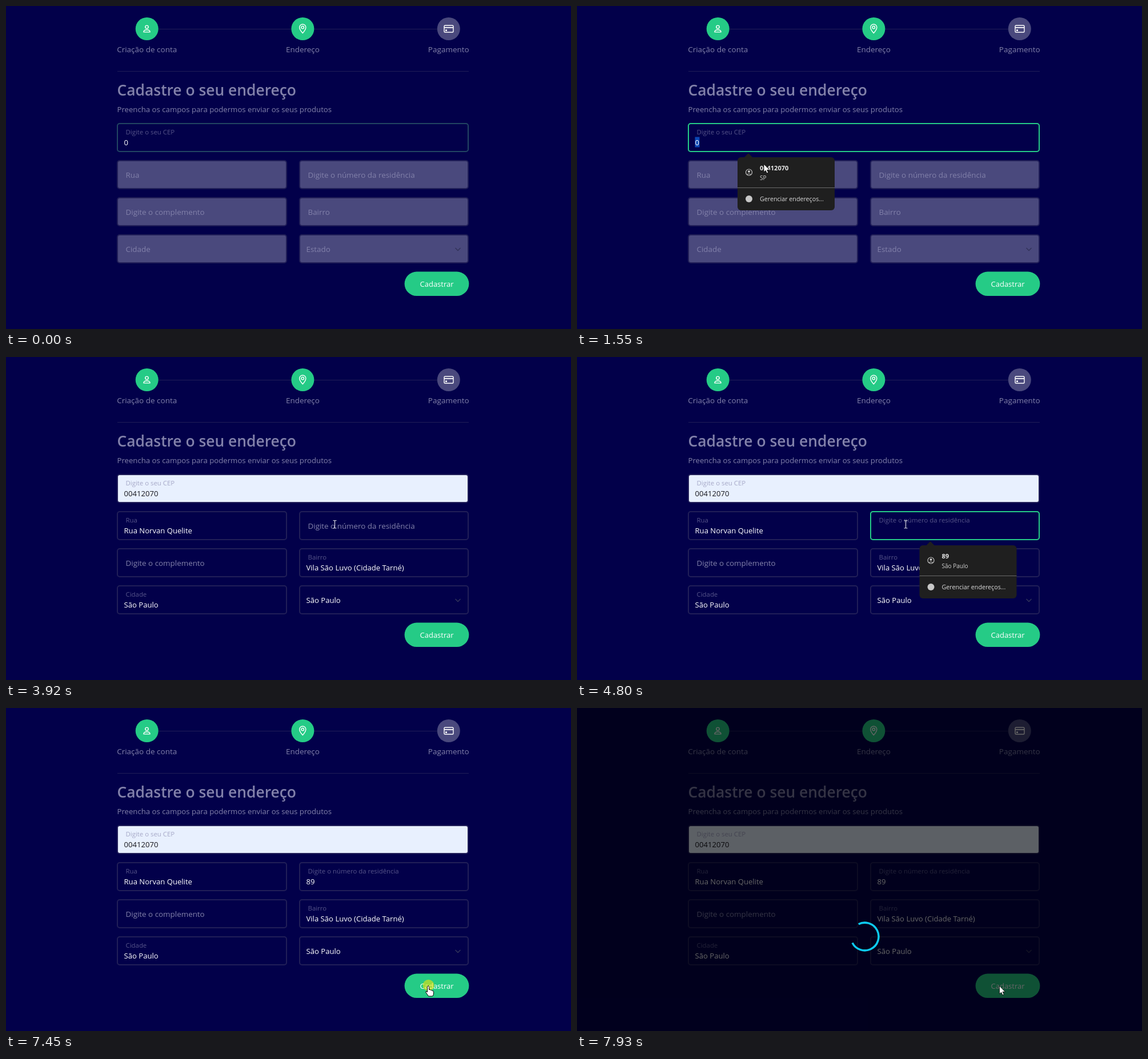
Animation of 989 by 566 pixels, one loop 8000 ms. Source, as an HTML page:

```html
<!DOCTYPE html>
<html lang="pt-BR">
<head>
<meta charset="utf-8">
<title>Cadastro de endereço</title>
<style>
html, body { margin: 0; width: 100%; height: 100%; overflow: hidden; background: #02004a; }
svg { display: block; font: 13.4px "Open Sans", "Noto Sans", sans-serif; white-space: pre; }
</style>
</head>
<body>
<svg id="stage" width="989" height="566" viewBox="0 0 989 566"></svg>
<script>
const LOOP = 8000;
const GREEN = '#25cb86', DIM = '#8281aa', LINE = '#211f58', GREY = '#4a497d';
const CEP = '00412070', STREET = 'Rua Norvan Quelite', DISTRICT = 'Vila São Luvo (Cidade Tarné)';
const FILLED = 2300, BLUR = 6800, LOADING = 7518;

const ramp = (t, a, b) => Math.min(1, Math.max(0, (t - a) / (b - a)));
const ease = p => p * p * (3 - 2 * p);
const within = (v, a, b) => v >= a && v < b;

const text = (x, y, s, fill = DIM, extra = '') => `<text x="${x}" y="${y}" fill="${fill}" ${extra}>${s}</text>`;
const middle = 'text-anchor="middle"';
const valueFont = 'font-size="13.1" font-weight="500"';

// Pointer stops: time, x, y
const stops = [
  [330, 470, 478], [950, 235, 240], [1060, 235, 240], [1200, 197, 240], [1320, 197, 240],
  [1550, 327, 277], [1660, 365, 289], [1800, 365, 289], [1890, 366, 290], [2700, 366, 290],
  [3040, 616, 450], [3310, 616, 450], [3370, 616, 457], [3510, 616, 457], [3900, 575.5, 293],
  [6210, 575.5, 293], [6500, 553, 454], [6560, 553, 454], [6750, 572, 510], [6880, 572, 510],
  [7380, 739.5, 487], [LOOP, 739.5, 487]
];
const presses = [[1060, 1240], [2160, 2300], [4270, 4400], [6750, 6880], [7400, 7518]];

const shapes = {
  arrow: '<path d="M0 0V14L3.2 11.2 5.4 16 7.8 15 5.6 10.3H10Z" fill="#fff" stroke="#000" stroke-width=".8"/>',
  beam: '<path d="M-3-6.5H-1L0-5.5 1-6.5H3M0-5.5V6M-3 7H-1L0 6 1 7H3" fill="none" stroke="#d5d5dc" stroke-width="1.2"/>',
  hand: '<path d="M-2 1.5Q-2 0-.5 0T1 1.5V6.5Q3.5 6 4 7.5 6 7 6.5 8.5 9 8 9 10.5V13Q9 16 7 18H0Q-1 16-4.5 11.5-5.5 9.5-3.5 9.5-2.5 9.8-2 11Z" fill="#fff" stroke="#000"/>'
};

function pointer(t) {
  if (t < stops[0][0]) return '';
  const i = stops.findIndex(s => s[0] > t);
  const [t0, x0, y0] = stops[i - 1], [t1, x1, y1] = stops[i];
  const p = ease(ramp(t, t0, t1));
  const x = x0 + (x1 - x0) * p, y = y0 + (y1 - y0) * p;
  const overInput = within(y, 206, 256) ||
    t > FILLED + 200 && x > 514 && (within(y, 271, 321) || within(y, 336, 386));
  const overButton = x > 698 && within(y, 466, 508) && t < LOADING;
  const shape = overButton ? 'hand' : overInput ? 'beam' : 'arrow';
  const halo = presses.some(([a, b]) => within(t, a, b))
    ? `<circle cx="${x}" cy="${y - 1}" r="10" fill="#ffe600" fill-opacity=".55"/>` : '';
  return `${halo}<g transform="translate(${x} ${y})">${shapes[shape]}</g>`;
}

function field(x, y, w, f) {
  const up = ease(f.up || 0);
  const box = `x="${x}" y="${y}" width="${w}" height="49" rx="4" stroke-width="2"`;
  return `<rect ${box} fill="${f.fill || 'none'}" stroke="${LINE}"/>` +
    (f.focus ? `<rect ${box} fill="none" stroke="${GREEN}" stroke-opacity="${f.focus}"/>` : '') +
    (f.mark || '') +
    (f.value ? text(x + 11.5, y + 38, f.value, f.ink || '#fff', valueFont) : '') +
    (f.label ? text(x + 14.5, y + 30 - 11 * up, f.label, DIM,
      `font-size="${13.4 - 2 * up}" opacity="${1 - .35 * up}"`) : '');
}

function popup(dx, dy, title, sub, shown, hover) {
  if (!shown) return '';
  const s = .94 + .06 * shown;
  return `<g opacity="${shown}" transform="translate(${366 + dx} ${310 + dy}) scale(${s}) translate(-366 -310)">
    <path d="M292 266L300 258 308 266Z" fill="#1f1f1f"/>
    <rect x="281" y="265" width="170" height="93" rx="6" fill="#1f1f1f"/>
    ${hover ? '<rect x="284" y="268" width="164" height="47" rx="4" fill="#38373e"/>' : ''}
    <path d="M281 318.5H451" stroke="#6a6a6a"/>
    <g fill="none" stroke="#c7c7c7" stroke-width="1.2">
      <circle cx="301" cy="291.5" r="5.5"/><path d="M297.5 295.5Q301 292.5 304.5 295.5"/>
    </g>
    <circle cx="301" cy="290" r="2" fill="#c7c7c7"/>
    <circle cx="301" cy="338" r="6" fill="#c7c7c7"/>
    ${text(320, 288, title, '#e8e8e8', 'font-size="11" font-weight="700"')}
    ${text(320, 305, sub, '#d0d0d0', 'font-size="10"')}
    ${text(320, 342, 'Gerenciar endereços...', '#dcdcdc', 'font-size="10.7"')}
  </g>`;
}

const step = (x, label, fill) => `<circle cx="${x}" cy="40" r="20" fill="${fill}"/>` +
  text(x, 81, label, DIM, middle + ' font-size="13.5"');

const header = `<path d="M267 40.5H500M539 40.5H755M195 114.5H810" stroke="#201e57"/>` +
  step(246.7, 'Criação de conta', GREEN) + step(519.4, 'Endereço', GREEN) + step(774.8, 'Pagamento', GREY) +
  `<g fill="none" stroke="#fff" stroke-width="1.4">
    <circle cx="246.5" cy="36.8" r="2.7"/>
    <path d="M241 45.6Q241 41.8 246.5 41.8T252 45.6Z"/>
    <path d="M519.3 47.5Q513.8 41.5 513.8 37.5A5.5 5.5 0 0 1 524.8 37.5Q524.8 41.5 519.3 47.5Z"/>
    <circle cx="519.3" cy="37.5" r="2.2"/>
    <rect x="767" y="34" width="16" height="12" rx="1.8"/>
    <path d="M767 37.8H783" stroke-width="1.8"/>
    <path d="M769 42.6H772" stroke-width="2.6"/>
  </g>` +
  text(194.5, 157, 'Cadastre o seu endereço', DIM, 'font-size="26.4" font-weight="600"') +
  text(194.5, 186, 'Preencha os campos para podermos enviar os seus produtos', DIM, 'font-size="13.2"');

const button = `<rect x="697.6" y="465.6" width="112.8" height="42.4" rx="21.2" fill="${GREEN}"/>` +
  text(754, 492, 'Cadastrar', '#fff', middle + ' font-size="13"');

function form(t) {
  const filled = t >= FILLED, preview = t >= 1620;
  const up = filled ? ramp(t, 2320, 2430) : 0;
  const fill = filled ? 'none' : GREY;
  const left = (y, f) => field(195, y, 296, { fill, ...f });
  const right = (y, f) => field(514, y, 295, { fill, ...f });

  const cepFocus = t < 1000 ? .22 * (1 - ramp(t, 0, 100))
    : ramp(t, 1000, 1120) * (1 - ramp(t, 2320, 2480));
  const selected = within(t, 1100, 1620)
    ? '<rect x="206.5" y="229.5" width="8" height="18" fill="#0b47b4"/>' : '';

  const number = t < 5400 ? '' : t < 5540 ? '8' : '89';
  const caretOn = [[4270, 4800], [5330, 6070], [6540, BLUR]].some(([a, b]) => within(t, a, b));
  const caret = caretOn ? `<rect x="${525 + 7.6 * number.length}" y="294" width="1" height="19" fill="#fff"/>` : '';

  return field(195, 206, 614, {
      label: 'Digite o seu CEP', up: 1, focus: cepFocus, mark: selected,
      value: preview ? CEP : '0', ink: preview ? '#16161c' : '#fff', fill: preview ? '#e8f0fe' : 'none'
    }) +
    left(271, { label: 'Rua', up, value: filled && STREET }) +
    right(271, {
      label: 'Digite o número da residência', up: ramp(t, 4270, 4390), value: number, mark: caret,
      focus: ramp(t, 4270, 4400) * (1 - ramp(t, BLUR, BLUR + 150))
    }) +
    left(336, { label: 'Digite o complemento' }) +
    right(336, { label: 'Bairro', up, value: filled && DISTRICT }) +
    left(401, { label: 'Cidade', up, value: filled && 'São Paulo' }) +
    right(401, {}) +
    (filled ? text(525.5, 431, 'São Paulo', '#fff', valueFont) : text(525.5, 431, 'Estado')) +
    '<path d="M786.5 424L791 428.5 795.5 424" fill="none" stroke="#33345a" stroke-width="1.5"/>';
}

function loader(t) {
  const shown = ramp(t, LOADING, LOADING + 300);
  if (!shown) return '';
  return `<g opacity="${shown}"><rect width="989" height="566" fill-opacity=".6"/>
    <circle cx="503.7" cy="400.5" r="24.3" fill="none" stroke="#0dcaf0" stroke-width="3.5" pathLength="4"
      stroke-dasharray="3 1" transform="rotate(${(t - LOADING) * .48 + 45} 503.7 400.5)"/></g>`;
}

function draw(now) {
  const t = now % LOOP;
  document.getElementById('stage').innerHTML = header + form(t) + button +
    popup(0, 0, CEP, 'SP', ramp(t, 1240, 1340) * (1 - ramp(t, 2270, 2400)), t >= 1620) +
    popup(318.5, 65, '89', 'São Paulo', ramp(t, 4290, 4400) * (1 - ramp(t, BLUR, BLUR + 120))) +
    loader(t) + pointer(t);
}

const start = performance.now();
function tick() {
  draw(performance.now() - start);
  requestAnimationFrame(tick);
}
tick();
</script>
</body>
</html>
```
